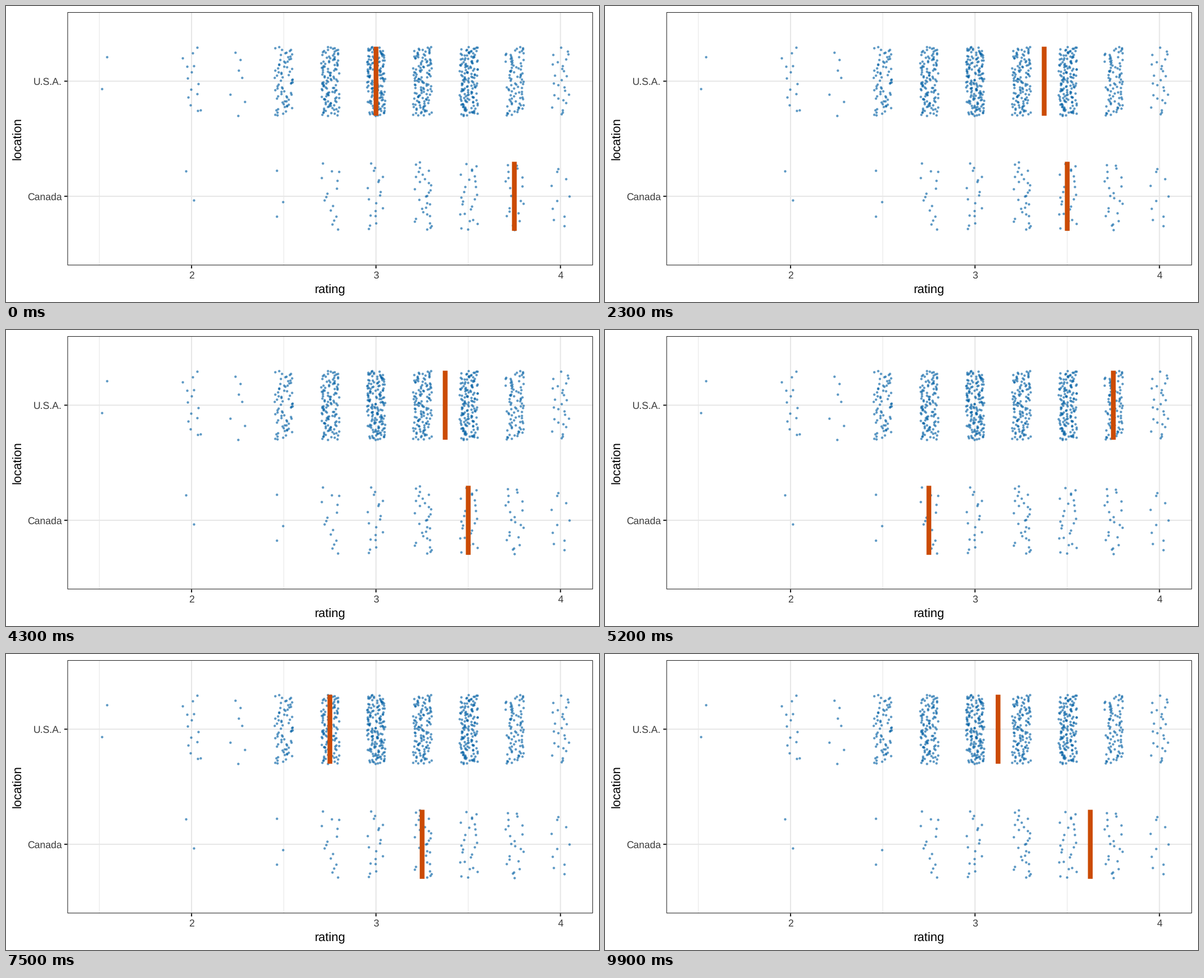
Write a matplotlib script that moves like this. It is 1058 px wide and 529 px high and loops after 10000 ms.

```python
import numpy as np
import matplotlib.pyplot as plt
from matplotlib.animation import FuncAnimation
from matplotlib.patches import Rectangle

W, H = 1058, 529
PX = 0.72  # points per pixel at 100 dpi
BLUE, ORANGE = "#005fa4", "#cb4b04"
GRID, DARK, GREY = "#e7e7e7", "#242424", "#3b3b3b"
LEFT, RIGHT, TOP, BOTTOM = 109.5, 1047.2, 11, 463.5
UNIT = (BOTTOM - TOP) / 2.2  # discrete rows with 0.6 padding
HALF = 0.3 * UNIT
BAR_W = 8.53
HOLD, PERIOD = 3, 4

# name, row centre, points per rating from lowest to highest
ROWS = [
    ("U.S.A.", TOP + 0.6 * UNIT,
     {1.5: 2, 2: 14, 2.25: 7, 2.5: 70, 2.75: 120, 3: 160,
      3.25: 125, 3.5: 150, 3.75: 85, 4: 26}),
    ("Canada", TOP + 1.6 * UNIT,
     {2: 2, 2.5: 3, 2.75: 15, 3: 18, 3.25: 30, 3.5: 25, 3.75: 22, 4: 10}),
]

# Median rating of each resample: (U.S.A., Canada)
DRAWS = [
    (3, 3.75), (3.5, 3.75), (3.25, 3.5), (2.75, 3.25), (3, 3.25),
    (2.75, 3.5), (4, 3.5), (3.25, 3), (2.75, 3.5), (3.5, 2.75),
    (3.25, 3.75), (3.5, 3.25), (3, 3.5), (3.75, 2.75), (3.75, 3.5),
    (3, 3.25), (3, 3.25), (3.25, 3), (2.75, 2.75), (2.75, 3.75),
    (3, 3.5), (3.5, 3.25), (4, 3.25), (2.75, 3.5), (3.25, 3.5),
]

plt.rcParams.update({"font.family": "Liberation Sans", "text.hinting": "none"})
rng = np.random.default_rng(7)
fig = plt.figure(figsize=(W / 100, H / 100), dpi=100, facecolor="white")
ax = fig.add_axes([0, 0, 1, 1])
ax.set(xlim=(0, W), ylim=(H, 0))
ax.axis("off")


def to_x(rating):
    return 660.15 + (rating - 3) * 329.1


def line(x0, y0, x1, y1, color, width=2.13):
    ax.plot([x0, x1], [y0, y1], color=color, lw=width * PX, zorder=1,
            solid_capstyle="butt", snap=False)


def text(x, y, s, size, color, ha="center", rotation=0):
    ax.text(x, y, s, size=size * PX, color=color, ha=ha, va="baseline",
            rotation=rotation, rotation_mode="anchor")


def jitter(rating, y, n):
    """Random x, evenly spread y around one rating of a row."""
    x = to_x(rating + rng.uniform(-0.05, 0.05, n))
    spread = (rng.permutation(n) + rng.random(n)) / n
    ax.scatter(x, y + (2 * spread - 1) * HALF, s=(3.1 * PX) ** 2, c=BLUE,
               edgecolors=BLUE, linewidths=1.42 * PX, alpha=0.5, zorder=2)


def add_bar(y):
    return ax.add_patch(Rectangle((0, y - HALF), BAR_W, 2 * HALF, fc=ORANGE,
                                  lw=0, snap=False, zorder=3))


for r in (1.5, 2.5, 3.5):
    line(to_x(r), TOP, to_x(r), BOTTOM, GRID, 1.07)
for r in (2, 3, 4):
    x = to_x(r)
    line(x, TOP, x, BOTTOM, GRID)
    line(x, BOTTOM, x, BOTTOM + 5.5, DARK)
    text(x, 486.7, str(r), 17.6, GREY)
for name, y, counts in ROWS:
    line(LEFT, y, RIGHT, y, GRID)
    line(LEFT - 5.5, y, LEFT, y, DARK)
    text(LEFT - 9.9, y + 6.4, name, 17.6, GREY, ha="right")
    for rating, n in counts.items():
        jitter(rating, y, n)
text((LEFT + RIGHT) / 2, 513.5, "rating", 22, "black")
text(27, (TOP + BOTTOM) / 2, "location", 22, "black", rotation=90)

bars = [add_bar(y) for _, y, _ in ROWS]
ax.add_patch(Rectangle((LEFT + 0.53, TOP + 0.53), RIGHT - LEFT - 1.06,
                       BOTTOM - TOP - 1.06, fill=False, ec=DARK,
                       lw=1.07 * PX, snap=False, zorder=4))


def update(i):
    step, phase = divmod(i, PERIOD)
    t = max(0, phase - HOLD + 1) / (PERIOD - HOLD + 1)
    following = DRAWS[(step + 1) % len(DRAWS)]
    for bar, a, b in zip(bars, DRAWS[step], following):
        bar.set_x(to_x(a + (b - a) * t) - BAR_W / 2)
    return bars


anim = FuncAnimation(fig, update, frames=PERIOD * len(DRAWS), interval=100,
                     repeat=True, repeat_delay=0, blit=False)
plt.show()
```
